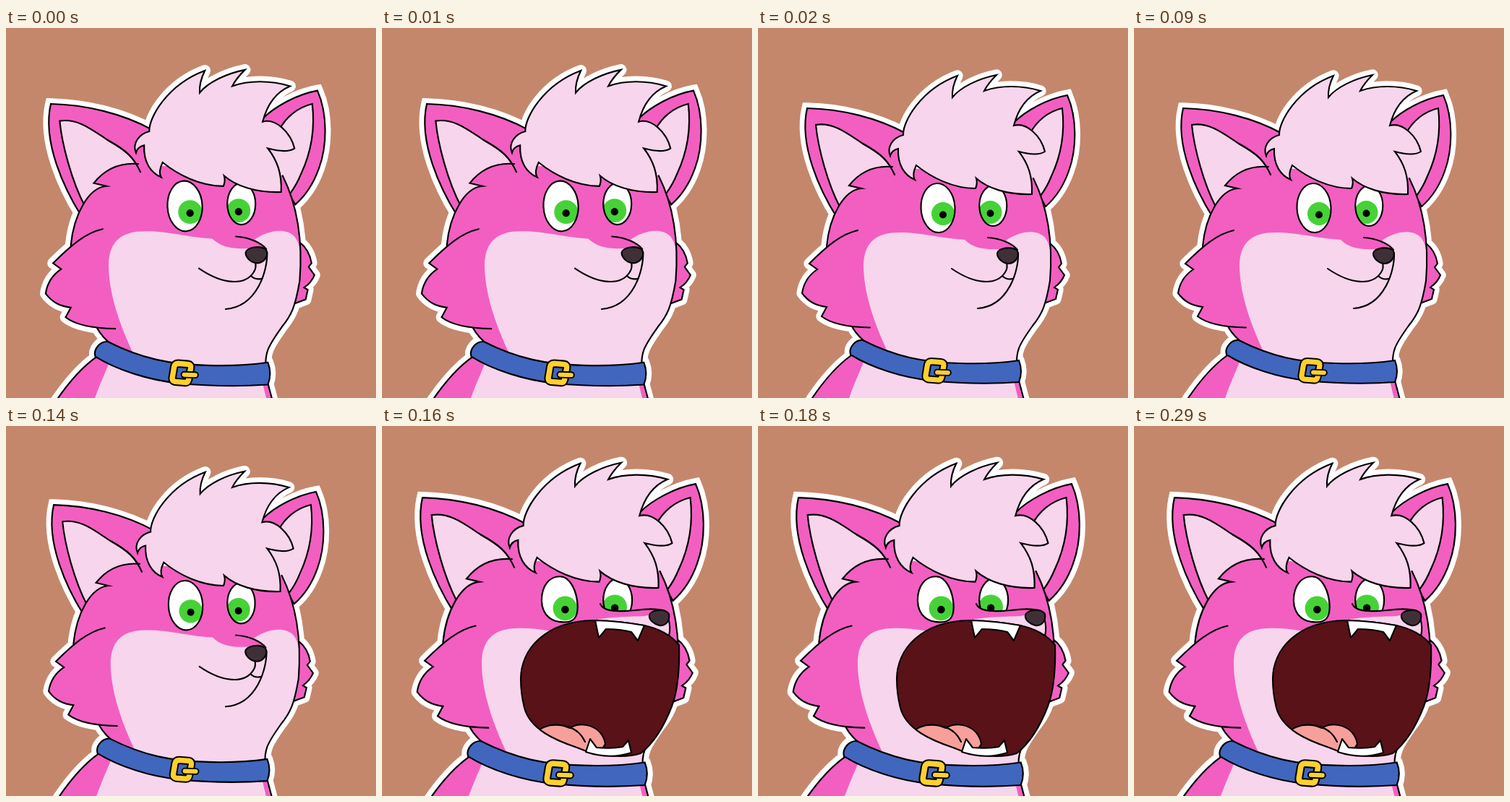
Animation, 512 px wide and 512 px high, one loop 360 ms. Source, as an HTML page with a canvas:

```html
<!DOCTYPE html>
<html>
<head>
<meta charset="utf-8">
<style>
html, body { margin: 0; height: 100%; overflow: hidden; background: #c4876b; }
canvas { display: block; width: 512px; height: 512px; }
</style>
</head>
<body>
<canvas id="stage" width="512" height="512"></canvas>
<script>
const g = document.getElementById('stage').getContext('2d');
const PINK = '#f25fc1', LIGHT = '#f7d5ec', WHITE = '#fff', INK = '#000';
const GREEN = '#46d237', NOSE = '#3f3038', GOLD = '#ffd02e', TONGUE = '#f7a09b';

const body = 'M129 453C108 468 90 490 75 512L69 522L370 522L361 488';
const chest = 'M147 460C139 480 131 496 123 522L362 522L354 488Z';
const leftEar = 'M109 262C87 227 56 163 68 111C115 112 165 124 205 146L200 200';
const leftEarInside = 'M114 249C96 215 83 165 80 134C105 130 125 147 145 160C170 174 180 183 189 203';
const earCrease = 'M145 160C170 174 180 183 189 203';
const rightEar = 'M355 130C370 115 400 98 428 93C442 125 441 168 430 198C424 215 413 234 398 247L380 215';
const rightEarInside = 'M362 175L377 145C385 130 400 116 421 111C425 145 420 175 406 205Q400 220 391 232';
const rightFur = 'M404 298C412 304 418 314 420 326L416 331L424 342Q420 352 410 359L415 362L412 375L396 381';
const head = 'M186 192C162 190 141 199 126 218L143 222C119 224 99 260 95 302L130 413C136 424 143 430 150 436' +
  'L240 476L358 470C357 447 360 440 380 412C393 396 398 385 404 350C408 300 402 250 381 208';
const muzzle = 'M186 462C168 425 146 375 146 328C147 295 165 283 195 283C230 283 250 291 286 293' +
  'C298 305 315 307 333 306L356 306C352 300 347 296 343 294C360 282 385 277 397 290C404 299 404 307 406 315L420 400L358 480Z';
const cheek = 'M138 280C115 285 95 302 71 326L82 334C70 342 63 354 61 367C70 379 80 384 95 386L88 399C102 410 125 414 155 414.5';
const hair = 'M201 148C200 130 225 85 276 66Q268 82 269 96C280 82 305 70 330 65Q318 77 313 87C335 79 365 79 391 87' +
  'C372 95 360 112 354 135C372 130 392 150 397 171C388 177 372 174 361 171C374 188 380 205 379 230' +
  'C345 231 318 222 302 208Q304 215 301 222C270 222 240 207 219 190C215 198 214 205 217 210' +
  'C203 204 193 190 194 167Q185 169 183 177C178 165 186 152 201 148Z';
const collar = 'M145 432C190 455 230 463 280 464C310 465 340 463 361 460Q367 475 361 490C320 493 280 492 240 488' +
  'C200 484 157 470 128 452C125 442 135 431 145 432Z';
const buckle = 'M240 461.5L253 462.5Q257.5 463 257 467L254 483Q253 487.5 249 487L236 486Q231.5 485 232 481L234.5 466Q235.5 461.5 240 461.5Z';
const prong = 'M248 476.5L263 477';
const mouth = 'M192 350C192 310 225 270 293 269Q330 270 363 276Q395 283 411 303C412 330 410 365 401 388' +
  'C391 414 378 437 358 453C330 462 290 454 270 445C240 435 205 420 197 390Q192 370 192 350Z';
const snoutTop = 'M302 246C306 258 330 257 350 255C365 253 380 252 392 256';

function oval(x, y, rx, ry = rx, turn = 0) {
  const p = new Path2D();
  p.ellipse(x, y, rx, ry, turn, 0, 7);
  return p;
}

function draw(shape, fill, line, width = 2.1) {
  const p = typeof shape === 'string' ? new Path2D(shape) : shape;
  if (fill) { g.fillStyle = fill; g.fill(p); }
  if (line) { g.strokeStyle = line; g.lineWidth = width; g.stroke(p); }
}

function inside(shape, paint) {
  g.save();
  g.clip(typeof shape === 'string' ? new Path2D(shape) : shape);
  paint();
  g.restore();
}

function halo(join, ...shapes) {
  g.lineJoin = join;
  for (const s of shapes) draw(s, WHITE, WHITE, 15.4);
}

function eye(shape, x, y) {
  draw(shape, WHITE);
  inside(shape, () => {
    draw(oval(x, y - 1, 16), GREEN);
    draw(oval(x, y + 0.5, 5), INK);
  });
  draw(shape, null, INK);
}

function closedMouth() {
  draw('M318 290C335 291 352 298 359 307M360 311C361 335 347 385 304 388', null, INK);
  draw('M268 333C300 355 330 357 342 338Q346 332 344 325M338 343Q344 349 352 347', null, INK);
  draw('M331 312C333 304 350 302 358 307C363 315 357 325 347 326C338 326 331 318 331 312Z', NOSE, INK);
}

function openMouth() {
  draw(snoutTop + 'L403 262L407 298L385 290L300 275Z', PINK);
  draw('M290 270C315 262 350 265 370 262L396 266Q400 278 397 291L363 278Z', LIGHT);
  draw('M396 266Q400 278 397 291', null, INK);
  draw(mouth, '#581218');
  inside(mouth, () => {
    draw('M215 422C230 410 250 413 260 418C274 408 304 413 309 440L290 470L210 460Z', TONGUE, INK);
    draw('M257 416C270 420 277 428 281 437', null, INK);
  });
  draw(mouth, null, INK);
  draw('M295 269L300 293L310 281Q330 281 345 285L354 297L363 276Q330 270 295 269Z', WHITE, INK);
  draw('M282 451L288 433L297 445Q318 447 333 444L341 435L345 452Q315 462 282 451Z', WHITE, INK);
  draw(snoutTop, null, INK);
  draw('M370 262C372 254 392 252 397 260C399 270 392 277 384 276C376 274 369 268 370 262Z', NOSE, INK);
}

function zoom(scale) {
  g.setTransform(scale, 0, 0, scale, 308 * (1 - scale), 350 * (1 - scale));
}

function render(scale, open) {
  g.setTransform(1, 0, 0, 1, 0, 0);
  g.fillStyle = '#c4876b';
  g.fillRect(0, 0, 512, 512);
  zoom(scale);
  g.lineCap = 'round';

  halo('miter', leftEar, rightEar);
  halo('round', body, rightFur, head, cheek, hair, collar);

  draw(body, PINK);
  draw(chest, LIGHT);
  draw(body, null, INK);
  g.lineJoin = 'miter';
  draw(leftEar, PINK, INK);
  draw(leftEarInside, LIGHT, INK);
  draw(rightEar, PINK, INK);
  draw(rightEarInside, LIGHT, INK);
  draw(rightFur, PINK, INK);
  draw(head, PINK);
  inside(head, () => draw(muzzle, LIGHT));
  draw(head, null, INK);
  draw(cheek, PINK, INK);
  draw(earCrease, null, INK);

  const leftEye = open
    ? new Path2D('M225 247C225 226 236 215 249 215C263 215 272 235 272.5 255C272.5 268 268 275 256 275C240 276 226 268 225 247Z')
    : oval(249, 249, 23.5, 34, -0.05);
  eye(leftEye, 256, 258);
  eye(oval(325.3, 246, 19, 28), 321.5, 256);
  g.lineJoin = 'round';
  if (open) {
    g.setTransform(1, 0, 0, 1, 0, 0);
    openMouth();
    zoom(scale);
  } else closedMouth();

  g.lineJoin = 'miter';
  draw(hair, LIGHT, INK);
  draw(collar, '#4166be', INK);
  g.lineJoin = 'round';
  draw(buckle, null, INK, 11.2);
  draw(buckle, null, GOLD, 7.2);
  draw(prong, null, INK, 9.6);
  draw(prong, null, GOLD, 5.8);
}

function tick(now) {
  const t = now % 360;
  if (t < 20) render(1.025, false);
  else if (t < 140) render(1, false);
  else if (t < 160) render(1.008, false);
  else render(1.05, true);
  requestAnimationFrame(tick);
}
tick(0);
</script>
</body>
</html>
```
